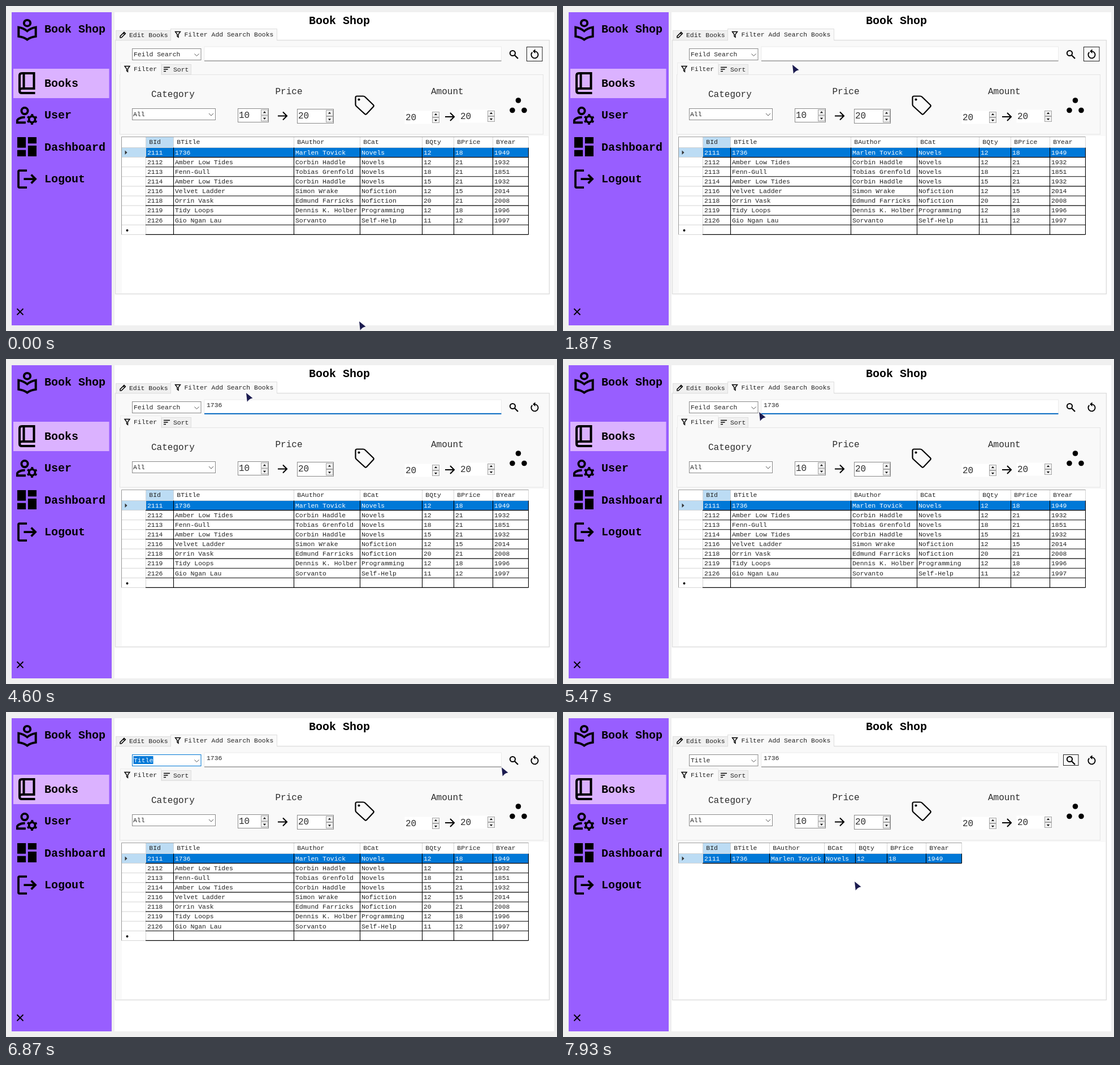
An HTML page for the animation above (8000 ms loop, 975 px wide and 575 px high).

```html
<!DOCTYPE html>
<html lang="en">
<head>
<meta charset="utf-8">
<title>Book Shop</title>
<style>
html, body { margin: 0; width: 100%; height: 100%; overflow: hidden; background: #f0f0f0; }
svg { display: block; width: 975px; height: 575px; }
text { font-family: "Courier New", "Liberation Mono", monospace; font-size: 11.45px; fill: #222; white-space: pre; }
.big { font-size: 20px; font-weight: bold; fill: #000; }
.mid { font-size: 16px; fill: #2c2c2c; }
.line { fill: none; stroke: #000; }
</style>
</head>
<body>
<svg id="stage" viewBox="0 0 975 575"></svg>
<script>
const DURATION = 8000, FPS = 15;
const BLUE = '#0078d7', PALE = '#bcdcf4', PAGE = '#f9f9f9', EDGE = '#dedede', INK = '#222';
const QUERY = '1736';

const rect = (x, y, w, h, fill, stroke = 'none', extra = '') =>
  `<rect x="${x}" y="${y}" width="${w}" height="${h}" fill="${fill}" stroke="${stroke}" ${extra}/>`;
const text = (x, y, s, extra = '') => `<text x="${x}" y="${y}" ${extra}>${s}</text>`;
const line = (d, w = 2, extra = '') => `<path class="line" d="${d}" stroke-width="${w}" ${extra}/>`;
const fill = (d, color = '#000') => `<path d="${d}" fill="${color}"/>`;
const dot = (x, y, r) => `<circle cx="${x}" cy="${y}" r="${r}"/>`;
const group = (id, body, extra = '') => `<g id="${id}" ${extra}>${body}</g>`;
const icon = (x, y, sx, sy, body) => `<g transform="translate(${x} ${y}) scale(${sx} ${sy})">${body}</g>`;
const chevron = (x, y) => line(`M${x - 4} ${y - 2}l4 4 4-4`, 1, 'style="stroke:#555"');
const arrow = (x, y) => line(`M${x} ${y}h16m-7-7l7 7-7 7`, 2.1);
const funnel = (x, y) => line(`M${x} ${y}h9l-3.5 4.8v5l-2-1.6v-3.4z`, 1.4);

function sidebar() {
  const reader = '<circle class="line" cx="12" cy="5" r="3" stroke-width="2.1"/>' +
    line('M12 12.9C9.8 11 7 9.6 4 9.1V18.1c3 .3 5.8 1.4 8 3.2 2.2-1.8 5-2.9 8-3.2V9.1c-3 .5-5.8 1.9-8 3.8z', 2.1);
  const user = '<circle class="line" cx="10" cy="8" r="3" stroke-width="2.1"/>' +
    line('M10.3 14C7.5 14 5.5 14.7 3.9 15.7 3.2 16.2 3 16.8 3 17.4V19H11', 2.1) +
    '<circle class="line" cx="17" cy="16" r="2.9" stroke-width="2"/>' +
    '<circle class="line" cx="17" cy="16" r="4.2" stroke-width="1.7" stroke-dasharray="2 2.398" transform="rotate(16.4 17 16)"/>';
  const labels = [['Book Shop', 47], ['Books', 143], ['User', 199], ['Dashboard', 256], ['Logout', 312]];
  return rect(10, 11, 177, 554, '#985eff') + rect(13, 111, 169.5, 52, '#dbb2ff') +
    icon(14.7, 21.2, 1.9, 1.8, reader) +
    line('M24 150V123q0-4 4-4H49.5V146H28q-4 0-4 4 0 4 4 4H51.5M31.5 119V146', 4.1) +
    icon(14.3, 170.5, 1.87, 1.88, user) +
    icon(14.3, 226.3, 1.89, 1.89, fill('M3 13h8V3H3zM3 21h8v-6H3zM13 21h8V11h-8zM13 3v6h8V3z')) +
    icon(14.5, 283.5, 1.88, 1.88, line('M12 4H5a1 1 0 0 0-1 1v14a1 1 0 0 0 1 1h7M9 12H20M16 8l4 4-4 4')) +
    line('M19.5 535.5l11 11m0-11l-11 11', 1.8) +
    labels.map(([s, y]) => text(68, y, s, 'class="big"')).join('');
}

function spinner(x, y, w, h, value, framed) {
  const bx = x + w - 14, half = (h - 4) / 2, mid = bx + 6.5;
  const button = (by, dir) => rect(bx + .5, by + .5, 12, half - 1, '#f0f0f0', '#a5a5a5') +
    fill(`M${mid - 2.5} ${by + half / 2 + dir}h5l-2.5 ${-3 * dir}z`);
  return rect(x + .5, y + .5, w - 1, h - 1, '#fff', framed ? '#8a8a8a' : 'none') +
    text(x + 2, y + 16.5, value, 'class="mid"') + button(y + 2, 1) + button(y + 2 + half, -1);
}

function shell() {
  return rect(0, 0, 975, 575, '#f0f0f0') + sidebar() + rect(192, 11, 778, 554, '#fff') +
    text(536, 32, 'Book Shop', 'class="big"') +
    rect(193.5, 60.5, 768, 449, PAGE, EDGE, 'stroke-width="1.4"') +
    rect(205, 230, 755, 278, '#fff') +
    rect(194.5, 43.5, 97, 17, '#f0f0f0', EDGE) +
    line('M202 56v-2.6l7-7 2.4 2.4-7 7zM207.4 48l2.4 2.4', 1.5) + text(218, 55, 'Edit Books') +
    rect(291.5, 40.5, 188, 20, PAGE, EDGE) + rect(292, 59, 187, 3, PAGE) +
    funnel(299.5, 45.5) + text(315.5, 53.5, 'Filter Add Search Books');
}

function filterPanel() {
  return rect(201.5, 121.5, 749, 105.5, PAGE, '#e4e4e4') +
    rect(275.5, 103.5, 52, 17.5, '#f0f0f0', EDGE) +
    line('M279 108.5h11M279 112h7.5M279 115.5h4', 1.5) + text(296, 115.5, 'Sort') +
    rect(202.5, 100.5, 72, 21, PAGE, '#ececec') + rect(203, 120, 71, 3, PAGE) +
    funnel(210, 106.5) + text(226, 114.5, 'Filter') +
    text(257, 160.5, 'Category', 'class="mid"') + text(476.5, 155.5, 'Price', 'class="mid"') +
    text(752, 155.5, 'Amount', 'class="mid"') +
    rect(223.5, 181.5, 147, 20, '#fff', '#8a8a8a') + text(225, 195, 'All') + chevron(363, 192) +
    spinner(410, 181, 55, 25, 10, true) + arrow(481, 194.5) + spinner(515, 182, 65, 26, 20, true) +
    spinner(705, 185, 63, 24, 20) + arrow(777, 196) + spinner(802, 183, 64, 24, 20) +
    line('M618.5 162a2.5 2.5 0 0 1 2.5-2.5h11q2 0 3.2 1.2L650 175q1.5 1.6 0 3.2L638 191q-1.6 1.5-3.2 0L619.6 177q-1.1-1.2-1.1-3z', 2.2) +
    dot(624.5, 165.5, 2.1) + dot(906.5, 167, 4.8) + dot(896, 184.5, 4.8) + dot(917, 184.5, 4.8);
}

const HEADS = ['BId', 'BTitle', 'BAuthor', 'BCat', 'BQty', 'BPrice', 'BYear'];
const BOOKS = [
  '2111|1736|Marlen Tovick|Novels|12|18|1949',
  '2112|Amber Low Tides|Corbin Haddle|Novels|12|21|1932',
  '2113|Fenn-Gull|Tobias Grenfold|Novels|18|21|1851',
  '2114|Amber Low Tides|Corbin Haddle|Novels|15|21|1932',
  '2116|Velvet Ladder|Simon Wrake|Nofiction|12|15|2014',
  '2118|Orrin Vask|Edmund Farricks|Nofiction|20|21|2008',
  '2119|Tidy Loops|Dennis K. Holber|Programming|12|18|1996',
  '2126|Gio Ngan Lau|Sorvanto|Self-Help|11|12|1997'
].map(s => s.split('|'));

// each cell owns its black right and bottom edge; header cells have pale ones
function table(cols, rows, filtered) {
  const top = 250.5, step = 17.1, left = 205, first = cols[0], right = cols[7];
  const count = rows.length + (filtered ? 0 : 1), bottom = top + step * count;
  const pale = d => line(d, 1, 'style="stroke:#d4d4d4"');
  let out = rect(left, 231, right - left, bottom - 231, '#fff') +
    rect(first, 231, cols[1] - first, 19, PALE) +
    rect(left, top, first - left, step, PALE) +
    rect(first, top, right - first, step, BLUE) +
    pale(`M${left} ${top}H${right}M${first + .5} 231V${bottom}`);
  HEADS.forEach((h, i) => {
    out += text(cols[i] + 6.3, 244, h) + pale(`M${cols[i + 1] + .5} 231V250`) +
      line(`M${cols[i + 1] + .5} ${top}V${bottom}`, 1.1);
  });
  for (let i = 1; i <= count; i++) {
    const y = top + i * step;
    out += pale(`M${left} ${y}H${first}`) + line(`M${first} ${y}H${right + .5}`, 1.1);
  }
  out += line(`M${left - .5} ${bottom}V231.5H${right + .5}`, 1, 'style="stroke:#999"');
  rows.forEach((row, r) => row.forEach((s, c) => {
    out += text(cols[c] + 3, 262.8 + r * step, s, r ? '' : 'style="fill:#fff"');
  }));
  out += fill('M210.5 255.5l4 3.8-4 3.8z', '#333');
  if (!filtered) out += dot(214.5, 397, 2);
  return out;
}

const FIELDS = ['ID', 'Title', 'Author', 'Qty', 'Price', 'Year'];
const ITEM_TOP = 97, ITEM_H = 13.75;

document.getElementById('stage').innerHTML = shell() + filterPanel() +
  group('all', table([247, 296, 509, 626, 736, 792, 861, 924], BOOKS)) +
  group('found', table([247, 296, 365, 462, 517, 573, 642, 705], BOOKS.slice(0, 1), true)) +
  rect(351, 72, 525.5, 25, '#fff', '#ececec') +
  rect(351, 96.5, 525.5, 1.2, '#868686', 'none', 'id="under"') +
  text(355, 85, '', 'id="query"') + rect(361.5, 75, 1.1, 13, '#000', 'none', 'id="caret"') +
  rect(885.5, 75.5, 26.5, 19, 'none', '#222', 'id="searchFocus"') +
  '<circle class="line" cx="896.5" cy="83.5" r="4.6" stroke-width="2"/>' + line('M900 87l6 6', 2.3) +
  rect(921.5, 72.5, 27.5, 25, 'none', '#222', 'id="resetFocus"') +
  line('M931.3 81.8A6.1 6.1 0 1 0 935.5 80.1', 1.9) + fill('M936.5 76.2v7.8l-4.4-3.9z') +
  rect(223.5, 75.5, 121.5, 20, '#fff', '#8a8a8a', 'id="combo"') +
  rect(331, 76, 14, 19.5, '#cce4f7', BLUE, 'id="comboButton"') +
  rect(225.5, 78, 83, 14, BLUE, 'none', 'id="picked"') +
  rect(308.3, 78, 1.2, 14, '#e8974a', 'none', 'id="pickEnd"') +
  text(226, 88.5, '', 'id="field"') + chevron(337.5, 86.5) +
  group('menu', rect(226, 99, 122, 84, '#000', 'none', 'opacity=".18"') +
    rect(223.5, 96.5, 122, 84, '#fff', '#1c5f9e') + rect(224, 0, 121, ITEM_H, BLUE, 'none', 'id="hover"') +
    FIELDS.map((s, i) => text(226, 107.7 + i * ITEM_H, s, 'class="item"')).join('')) +
  group('pointer', fill('M0 0L11.5 9.2Q5.5 10 1.8 15.8z', '#1b1b4f')) +
  group('beam', line('M-3-8h2l1 1 1-1h2M0-7V7M-3 8h2l1-1 1 1h2', 1));

const $ = id => document.getElementById(id);
const set = (id, name, value) => $(id).setAttribute(name, value);
const show = (id, on) => set(id, 'display', on ? 'inline' : 'none');
const items = document.querySelectorAll('.item');

// time, x, y of the mouse
const PATH = [
  [0, 625, 558], [130, 639, 520], [400, 500, 74], [600, 408, 281], [865, 408, 281],
  [1130, 360, 91], [1465, 412, 270], [1600, 412, 270], [1850, 406, 104], [1935, 406, 104],
  [2250, 420, 91], [4590, 425, 60], [4605, 425, 60], [4930, 552, 60], [5400, 350, 95],
  [5600, 339, 91], [5870, 339, 91], [6200, 240, 114], [6460, 240, 114], [6865, 877, 98],
  [7130, 904, 82], [7600, 904, 82], [7930, 516, 300], [8000, 516, 300]
];

function mouseAt(t) {
  const i = Math.max(1, PATH.findIndex(p => p[0] >= t));
  const [t0, x0, y0] = PATH[i - 1], [t1, x1, y1] = PATH[i];
  const k = (t - t0) / (t1 - t0), e = k * k * (3 - 2 * k);
  return [x0 + (x1 - x0) * e, y0 + (y1 - y0) * e];
}

function update(time) {
  const t = Math.floor(time * FPS / 1000 + .06) * 1000 / FPS;
  const [x, y] = mouseAt(t);
  const typed = [2660, 3130, 3595, 4060].filter(k => t >= k).length;
  const focused = t >= 2200 && t < 5660;
  const open = t >= 5660 && t < 6520, chosen = t >= 6520;
  const comboActive = t >= 5660 && t < 7300, filtered = t >= 7390;

  $('query').textContent = QUERY.slice(0, typed);
  set('caret', 'x', 355.2 + typed * 6.87);
  show('caret', t >= 2200 && t < 4590);
  set('under', 'fill', focused ? '#0067c0' : '#868686');
  set('under', 'y', focused ? 95.8 : 96.5);
  set('under', 'height', focused ? 2 : 1.2);

  show('resetFocus', t < 2200);
  show('searchFocus', t >= 7300);
  show('all', !filtered);
  show('found', filtered);

  set('combo', 'stroke', comboActive ? BLUE : '#8a8a8a');
  show('comboButton', open);
  show('picked', comboActive);
  show('pickEnd', open);
  set('picked', 'width', chosen ? 35 : 83);
  $('field').textContent = chosen ? 'Title' : 'Feild Search';
  $('field').style.fill = comboActive ? '#fff' : INK;

  show('menu', open);
  const over = y > ITEM_TOP && x < 338 ? Math.floor((y - ITEM_TOP) / ITEM_H) : -1;
  show('hover', open && over >= 0);
  set('hover', 'y', ITEM_TOP + over * ITEM_H);
  items.forEach((el, i) => { el.style.fill = i === over ? '#fff' : INK; });

  const visible = t < 2660 || t >= 4590;
  const inText = x > 351 && x < 876 && y > 72 && y < 98;
  for (const id of ['pointer', 'beam']) {
    set(id, 'transform', `translate(${x.toFixed(1)} ${y.toFixed(1)})`);
    show(id, visible && inText === (id === 'beam'));
  }
}

function tick() {
  update(performance.now() % DURATION);
  requestAnimationFrame(tick);
}
tick();
</script>
</body>
</html>
```
